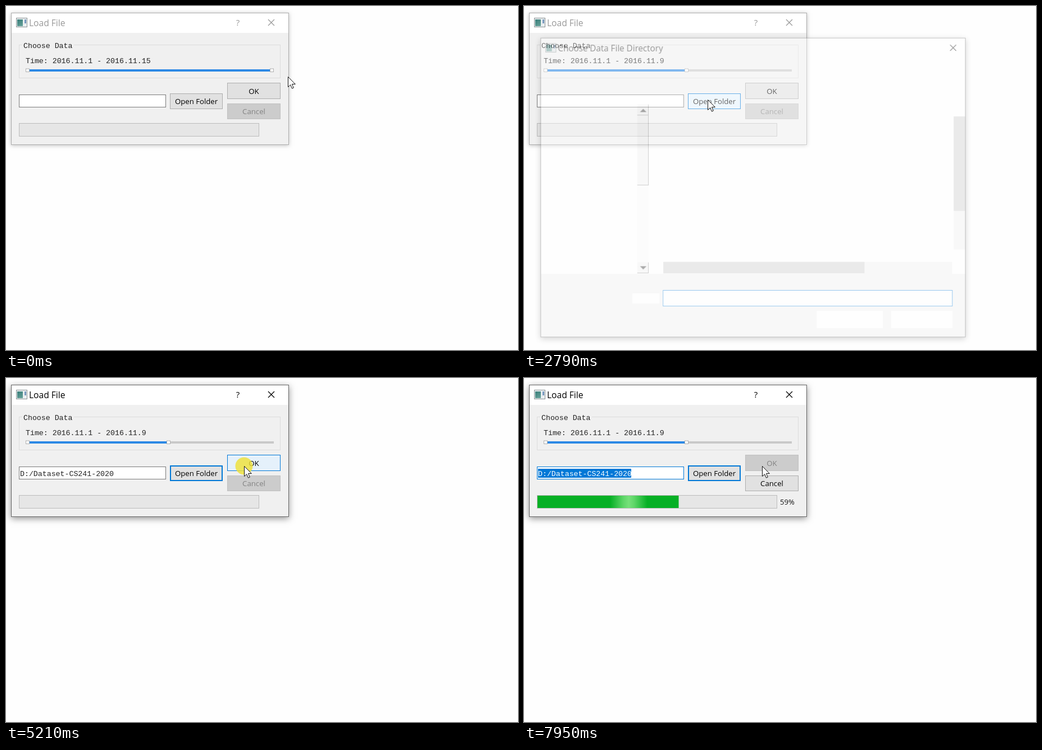
Animation, 912 px wide and 614 px high, one loop 8000 ms. Source, as an HTML page with a canvas:

```html
<!DOCTYPE html>
<html lang="en">
<head>
<meta charset="utf-8">
<title>Load File</title>
<style>
html, body { margin: 0; width: 100%; height: 100%; overflow: hidden; background: #fefefe; }
canvas { display: block; }
</style>
</head>
<body>
<canvas id="stage" width="912" height="614"></canvas>
<script>
const stage = document.getElementById('stage');
const layer = stage.cloneNode();
const stageCtx = stage.getContext('2d'), layerCtx = layer.getContext('2d');
let g = stageCtx;
const LOOP = 8000;
const UI = '"Open Sans", "Noto Sans", "Noto Sans CJK SC", "Noto Sans CJK", sans-serif';
const MONO = '"Liberation Mono", monospace';
const BLUE = '#0078d7';

// Pointer path: time, x, y
const path = [
  [30, 502, 126], [310, 478, 113], [490, 478, 113], [540, 471, 113], [720, 471, 113],
  [1490, 319.5, 115], [1690, 288, 127], [2030, 288, 127], [2230, 327, 167], [2940, 327, 167],
  [3180, 340, 248], [3300, 340.5, 251], [3650, 340.5, 251], [4030, 558, 558], [4500, 558, 558],
  [5060, 424, 157]
];
const clicks = [[690, 1840], [2420, 2600], [3330, 3580], [4080, 4300], [5210, 5400]];

const rows = [
  ['build-GraphViz-Desktop_Qt_6_0_0_Mi...', '2019/9/27 23:25'],
  ['Dataset-CS241-2020', '2020/12/1 16:39'],
  ['env', '2020/12/1 0:51'],
  ['NetCrate', '2020/11/19 16:06'],
  ['NetCrateTemp', '2020/8/20 10:58'],
  ['PDF', '2019/7/16 18:13'],
  ['Program Files', '2020/6/15 23:17'],
  ['sample-project', '2019/9/27 23:29'],
  ['ssh', '2020/11/22 19:36']
];
const places = [
  ['3D 对象', '#28a0dc'], ['视频', '#6b5a4c'], ['图片', '#5fa8d8'], ['文档', '#a9cbe6'],
  ['下载', '#2486d8'], ['音乐', '#2196e0'], ['桌面', '#1388dc']
];
const hint = [
  '创建日期: 2020/12/1 16:37', '大小: 377 MB', '文件夹: .ipynb_checkpoints',
  '文件: .DS_Store, order_20161101_part0.csv, ...'
];

const within = (t, a, b) => t >= a && t < b;
const clamp = v => Math.max(0, Math.min(1, v));

function pointer(t) {
  const i = path.findIndex(p => p[0] > t);
  if (i === 0) return path[0].slice(1);
  if (i < 0) return path[path.length - 1].slice(1);
  const [t0, x0, y0] = path[i - 1], [t1, x1, y1] = path[i];
  const p = (t - t0) / (t1 - t0);
  return [x0 + (x1 - x0) * p, y0 + (y1 - y0) * p];
}

function rect(x, y, x2, y2, fill) {
  g.fillStyle = fill;
  g.fillRect(x, y, x2 - x, y2 - y);
}

function box(x, y, x2, y2, fill, edge, w = 1) {
  rect(x, y, x2, y2, edge);
  rect(x + w, y + w, x2 - w, y2 - w, fill);
}

// y is the middle of the capitals
function text(s, x, y, { color = '#111', size = /^[\u4e00-\u9fff]/.test(s) ? 15.5 : 16, font = UI, align = 'left' } = {}) {
  g.font = `${size}px ${font}`;
  g.textAlign = align;
  g.fillStyle = color;
  g.fillText(s, x, y + size * 0.357);
}

function mono(s, x, y, color = '#222') {
  text(s, x, y, { color, size: 13.25, font: MONO });
}

function line(points, color, w = 1.5) {
  g.beginPath();
  points.forEach(([x, y], i) => i ? g.lineTo(x, y) : g.moveTo(x, y));
  g.strokeStyle = color;
  g.lineWidth = w;
  g.stroke();
}

function shape(points, fill) {
  g.beginPath();
  for (const [x, y] of points) g.lineTo(x, y);
  g.fillStyle = fill;
  g.fill();
}

function disc(x, y, r, fill) {
  g.beginPath();
  g.arc(x, y, r, 0, 7);
  g.fillStyle = fill;
  g.fill();
}

// Small v shape, turned by quarter turns: 0 down, 1 left, 2 up, 3 right
function chevron(x, y, turn = 0, r = 3.5, color = '#444', w = 1.6) {
  g.save();
  g.translate(x, y);
  g.rotate(turn * Math.PI / 2);
  line([[-r, -r / 2], [0, r / 2], [r, -r / 2]], color, w);
  g.restore();
}

function arrow(x, y, turn, color) {
  g.save();
  g.translate(x, y);
  g.rotate(turn * Math.PI / 2);
  line([[0, -7], [0, 6]], color, 1.7);
  line([[-5, 1], [0, 6], [5, 1]], color, 1.7);
  g.restore();
}

function cross(x, y, color) {
  line([[x - 5.5, y - 5.5], [x + 5.5, y + 5.5]], color, 1.2);
  line([[x + 5.5, y - 5.5], [x - 5.5, y + 5.5]], color, 1.2);
}

function frame(x, y, x2, y2, active) {
  g.save();
  g.shadowColor = active ? 'rgba(0,0,0,.42)' : 'rgba(0,0,0,.24)';
  g.shadowBlur = active ? 11 : 7;
  g.shadowOffsetY = active ? 3 : 1;
  rect(x, y, x2, y2, '#f0f0f0');
  g.restore();
  box(x, y, x2, y2, '#f0f0f0', active ? '#666' : '#adadad');
}

function appIcon(x, y) {
  box(x, y, x + 20, y + 17, '#e9eef0', '#8a9294');
  const fade = g.createLinearGradient(x, y, x + 12, y + 17);
  fade.addColorStop(0, '#2f7673');
  fade.addColorStop(1, '#6ca69d');
  rect(x + 2, y + 3, x + 12, y + 15, fade);
  rect(x + 15, y + 3, x + 18, y + 10, '#7797bd');
}

function folder(x, y, pale) {
  rect(x, y - 8, x + 7, y + 7, pale ? '#f5e7b4' : '#f2cf6b');
  rect(x + 3, y - 6, x + 12, y + 8, pale ? '#fbf1cd' : '#fbdf8c');
}

function drive(x, y) {
  shape([[x, y + 3], [x + 12, y - 1], [x + 18, y + 2], [x + 18, y + 5], [x + 6, y + 9], [x, y + 6]], '#a4a8ab');
  line([[x, y + 5], [x + 6, y + 8], [x + 18, y + 4]], '#55595c', 1.5);
  rect(x + 11, y - 8, x + 17, y, '#d0d3d6');
}

function button(x, y, x2, y2, label, state, size = 13.2) {
  const [fill, edge, w, color] = {
    plain: ['#e1e1e1', '#adadad', 1, '#000'],
    focus: ['#e1e1e1', BLUE, 2, '#000'],
    hover: ['#e5f1fb', BLUE, 1, '#000'],
    press: ['#cce4f7', '#2a78b8', 1, '#000'],
    off: ['#ccc', '#bfbfbf', 1, '#838383']
  }[state];
  box(x, y, x2, y2, fill, edge, w);
  text(label, (x + x2) / 2, (y + y2) / 2 + 0.5, { size, color, align: 'center' });
}

function progress(t) {
  box(23, 209, 451, 233, '#e6e6e6', '#bcbcbc');
  if (t < 5260) return;
  const pct = Math.floor(21.05 + (t - 6160) * 38 / 1790);
  const end = 23 + 428 * pct / 100;
  rect(24, 210, end, 232, '#06b025');
  const cx = -5 + 0.184 * ((t - 5310 + 1600) % 1600);
  if (t >= 5310) {
    const shine = g.createLinearGradient(cx - 33, 0, cx + 33, 0);
    [[0, 0], [0.36, 0.8], [0.5, 1], [0.64, 0.8], [1, 0]].forEach(([p, a]) =>
      shine.addColorStop(p, `rgba(118,224,122,${a})`));
    const left = Math.max(24, cx - 33), right = Math.min(end, cx + 33);
    if (right > left) rect(left, 210, right, 232, shine);
  }
  text(pct + '%', 456, 221.5, { size: 13.2 });
}

function mainWindow(t, cx) {
  const active = within(t, 690, 2690) || t >= 4450;
  const ink = active ? '#000' : '#999';
  frame(9, 12, 504, 248, active);
  rect(10, 13, 503, 48, '#fff');
  appIcon(18, 21);
  text('Load File', 41, 30, { size: 15.6, color: ink });
  text('?', 413, 30, { size: 15, color: ink, align: 'center' });
  cross(472.5, 29.5, ink);

  box(23, 69, 489, 129, '#f0f0f0', '#dcdcdc');
  rect(29, 66, 121, 76, '#f0f0f0');
  mono('Choose Data', 31, 70);
  const knob = t < 720 ? 473.5 : t > 1690 ? 289.5 : Math.min(473.5, cx + 1.5);
  const day = 1 + Math.round((knob - 38) / 435 * 14);
  mono('Time: 2016.11.1 - 2016.11.' + day, 35, 97);
  rect(36, 113, 477, 117, '#c9c9c9');
  rect(38, 113, knob, 117, '#2d89e5');
  for (const x of [38.5, knob]) box(x - 3.5, 111.5, x + 3.5, 118, '#fff', '#b0b0b0');

  const chosen = t >= 5260;
  box(23, 158, 285, 181, '#fff', chosen ? BLUE : '#7a7a7a');
  if (t >= 4500) {
    const caret = Math.floor((t - 5060) / 530) % 2 === 0;
    if (chosen) rect(25, 162, caret ? 192 : 191, 178, BLUE);
    mono('D:/Dataset-CS241-2020', 25, 170, chosen ? '#fff' : '#222');
  }
  button(292, 156, 386, 184, 'Open Folder', within(t, 2130, 2950) ? 'hover' : active ? 'focus' : 'plain');
  button(394, 137, 489, 166, 'OK', chosen ? 'off' : t >= 4980 ? 'hover' : 'plain');
  button(394, 174, 489, 202, 'Cancel', chosen ? 'plain' : 'off');
  progress(t);
}

function sidebar() {
  shape([[54, 188], [67, 191], [65, 203], [52, 198]], '#3b97d3');
  shape([[50, 200], [62, 202], [66, 206], [55, 206]], '#b5c7d3');
  text('此电脑', 71, 197);
  places.forEach(([name, tint], i) => {
    const y = 228 + 30.6 * i;
    folder(62, y);
    rect(69, y, 77, y + 8, tint);
    text(name, 82, y);
  });
  rect(18, 457, 195, 483, '#d9d9d9');
  drive(60, 441);
  rect(59, 435, 67, 443, '#1c93dd');
  text('Local Disk (C:)', 82, 442);
  drive(60, 472);
  text('office (D:)', 82, 472);
}

function navigation(inside) {
  arrow(40, 108, 1, inside ? '#444' : '#c9c9c9');
  arrow(72, 108, 3, '#c9c9c9');
  chevron(100, 108.5, 0, 3, inside ? '#666' : '#bbb');
  arrow(125, 109, 2, '#555');
  box(141, 88, 526, 128, '#fff', '#d9d9d9');
  rect(483, 89, 484, 127, '#d9d9d9');
  box(532, 88, 791, 128, '#fff', '#d9d9d9');
  if (inside) {
    folder(147, 107);
    text('«', 171, 107, { size: 12 });
    text('offic...', 188, 108);
    chevron(244, 108.5, 3);
    text('Dataset-CS24...', 259, 108);
    chevron(385, 108.5, 3);
  } else {
    drive(145, 107);
    chevron(174, 108.5, 3);
    text('此电脑', 187, 108);
    chevron(244, 108.5, 3);
    text('office (D:)', 257, 108);
    chevron(340, 108.5, 3);
  }
  chevron(462, 108, 0, 4.5);
  text('↻', 504, 107, { size: 17, color: '#444', align: 'center' });
  g.beginPath();
  g.arc(561, 105, 5, 0, 7);
  g.strokeStyle = '#777';
  g.lineWidth = 1.2;
  g.stroke();
  line([[557, 109], [551, 115]], '#777', 1.4);
  text(`搜索"${inside ? 'Dataset-CS241-2020' : 'office (D:)'}"`, 583, 108, { color: '#6d6d6d' });

  text('组织', 40, 151, { color: '#1e395b' });
  text('新建文件夹', 116, 151, { color: '#1e395b' });
  for (const x of [78, 719]) shape([[x - 3, 150], [x + 3, 150], [x, 153]], '#333');
  for (let i = 0; i < 4; i++) {
    rect(687, 145 + i * 4, 690, 147 + i * 4, '#b39a86');
    for (let x = 692; x < 704; x += 6) rect(x, 145.5 + i * 4, x + 5, 146.5 + i * 4, '#999');
  }
  disc(768, 151, 9.5, '#0b62bf');
  text('?', 768, 151, { color: '#fff', size: 14, align: 'center' });
}

function underline(x, y, s) {
  const w = g.measureText(s).width;
  rect(x, y + 7, x + w, y + 8, g.fillStyle);
}

function fileList(t, inside) {
  const head = { color: '#4c607a' };
  const typeX = inside ? 759 : 728;
  text('名称', 243, 188, head);
  text('修改日期', 575, 188, head);
  text('类型', typeX, 188, head);
  for (const x of [567, typeX - 8]) rect(x, 172, x + 1, 205, '#e5e5e5');
  chevron(401, 174, 2, 3.5, '#888', 1);
  const items = inside ? [['.ipynb_checkpoints', '2020/11/19 22:06']] : rows;
  items.forEach(([name, date], i) => {
    const y = 226 + 27.2 * i;
    const hot = !inside && i === 1 && t >= 3130;
    if (hot) rect(240, 239, 774, 267, t >= 3450 ? '#cce8ff' : '#e5f3ff');
    folder(247, y - 1, i === 4);
    if (i === 3) disc(257, y + 2, 6, '#0f6fc6');
    for (const [s, x, color] of [[name, 270, '#111'], [date, 575, '#6d6d6d'], ['文件夹', typeX, '#6d6d6d']]) {
      text(s, x, y, { color });
      if (hot) underline(x, Math.round(y), s);
    }
  });
}

function dialogScrollbars(ready, inside) {
  rect(195, 172, 216, 483, ready ? '#f0f0f0' : '#fafafa');
  if (ready) rect(195, 345, 216, 427, '#cdcdcd');
  else {
    for (const [top, bottom] of [[171, 191], [191, 320], [462, 482]]) {
      rect(195, top, 216, bottom, '#888');
      rect(195, top, 215, bottom - 1, '#f0f0f0');
    }
    shape([[200, 185], [212, 185], [206, 179]], '#333');
    shape([[200, 469], [212, 469], [206, 475]], '#333');
  }
  if (ready) {
    chevron(206, 183, 2);
    chevron(206, 472, 0);
  }
  const right = inside ? 797 : 774;
  rect(ready ? 222 : 243, 461, right, 483, '#f0f0f0');
  rect(243, 461, inside ? 628 : 613, 482, '#cdcdcd');
  if (ready) {
    chevron(232, 472, 1);
    chevron(right - 10, 472, 3);
  }
  if (inside) return;
  rect(777, ready ? 172 : 193, 798, ready ? 461 : 438, '#f0f0f0');
  rect(777, 193, 798, 367, '#cdcdcd');
  if (ready) {
    chevron(787, 184, 2);
    chevron(787, 450, 0);
  }
}

function tooltip() {
  g.save();
  g.shadowColor = 'rgba(0,0,0,.35)';
  g.shadowBlur = 4;
  g.shadowOffsetX = g.shadowOffsetY = 2;
  rect(341, 267, 678, 349, '#fff');
  g.restore();
  box(341, 267, 678, 349, '#fff', '#767676');
  hint.forEach((s, i) => text(s, 344, 278 + 20 * i, { color: '#575757' }));
}

function dialog(t) {
  const ready = t >= 2990, inside = t >= 3630, ending = t >= 4300;
  frame(17, 48, 799, 600, true);
  rect(18, 49, 798, 483, '#fff');
  if (!ending) appIcon(26, 58);
  text('Choose Data File Directory', ending ? 25.5 : 49, 67, { size: 15.7 });
  if (!ending) cross(776, 66.5, '#000');
  if (ready) {
    rect(18, 132, 798, 171, '#f5f6f7');
    rect(18, 171, 798, 172, '#ececec');
    navigation(inside);
    sidebar();
    g.save();
    g.beginPath();
    g.rect(217, 172, 581, 289);
    g.clip();
    fileList(t, inside);
    g.restore();
  }
  dialogScrollbars(ready, inside);

  const picked = t >= 3450;
  box(242, 513, 775, 543, '#fff', picked ? '#7a7a7a' : BLUE);
  if (picked) text('Dataset-CS241-2020', 244.5, 525);
  if (ready) {
    text('文件夹:', 186, 528);
    button(526, 550, 647, 582, '选择文件夹', t >= 4080 ? 'press' : t >= 3990 ? 'hover' : 'focus', 15.4);
    button(663, 550, 774, 582, '取消', 'plain', 15.4);
    for (let i = 0; i < 3; i++)
      for (let j = 0; j <= i; j++) rect(792 - 4 * j, 588 + 4 * i, 794 - 4 * j, 590 + 4 * i, '#b8b8b8');
  } else {
    rect(186, 519, 236, 538, '#fff');
    rect(525, 551, 647, 583, '#fff');
    rect(662, 551, 775, 583, '#fff');
  }
  if (within(t, 3330, 3600)) tooltip();
}

// The dialog is painted on its own layer so that it fades as a whole
function showDialog(t) {
  if (!within(t, 2690, 4650)) return;
  const opening = clamp((t - 2690) / 250), closing = clamp((t - 4450) / 200);
  const scale = 0.947 + 0.053 * opening - 0.06 * closing;
  g = layerCtx;
  g.clearRect(0, 0, 912, 614);
  dialog(t);
  g = stageCtx;
  g.save();
  g.globalAlpha = opening * (1 - closing);
  g.translate(407.5, 323.5);
  g.scale(scale, scale);
  g.drawImage(layer, -407.5, -323.5);
  g.restore();
}

const arrowShape = new Path2D('M.5 .5V18.5L4.7 14.6L7.5 21.2L10.3 20L7.5 13.5H13.3Z');
const handShape = new Path2D('M-1.5 1C-1.5-2 2.5-2 2.5 1V8C6 7 7 8 7 9C10 8.5 11 10 11 12V16L8 21H0L-7 13C-8 10-5 10-3.5 12L-1.5 14Z');

function drawPointer(t, x, y) {
  if (clicks.some(([a, b]) => within(t, a, b))) disc(x, y, 15.5, 'rgba(238,224,56,.82)');
  if (within(t, 4300, 4480)) return;
  const outline = within(t, 3130, 3700) ? handShape : arrowShape;
  g.save();
  g.translate(x, y);
  g.fillStyle = '#fff';
  g.strokeStyle = '#111';
  g.lineWidth = 1;
  g.fill(outline);
  g.stroke(outline);
  g.restore();
}

function draw() {
  const t = performance.now() % LOOP;
  const [x, y] = pointer(t);
  rect(0, 0, 912, 614, '#fefefe');
  mainWindow(t, x);
  showDialog(t);
  drawPointer(t, x, y);
  requestAnimationFrame(draw);
}
draw();
</script>
</body>
</html>
```
